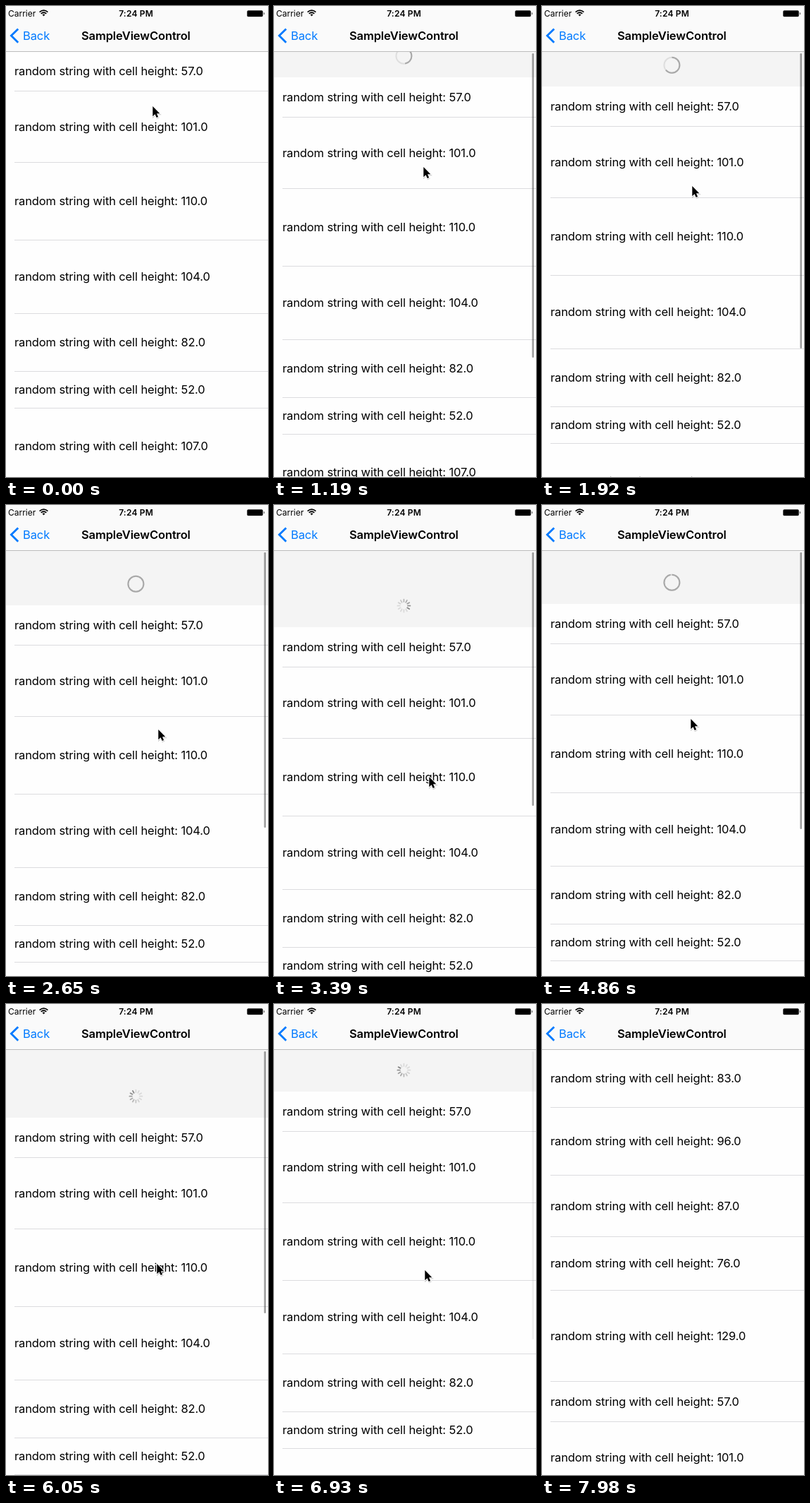
These frames come from a looping animation (372 px wide and 667 px high, 8780 ms). An HTML page:

```html
<!DOCTYPE html>
<html lang="en">
<head>
<meta charset="utf-8">
<title>Pull to refresh</title>
<style>
  html, body { margin: 0; width: 100%; height: 100%; overflow: hidden; background: #fff; }
  svg { display: block; width: 372px; height: 667px; }
  text { font-family: Inter, Roboto, sans-serif; font-size: 16.5px; letter-spacing: -0.12px; white-space: pre; }
  .semi { font-weight: 600; }
  .status { font-size: 12px; letter-spacing: 0; }
</style>
</head>
<body>
<svg viewBox="0 0 372 667">
  <defs><path id="arrow" d="M0 0V14.2L3.3 11.2 5.4 16 7.8 15 5.7 10.3H10Z"/></defs>
  <rect width="372" height="667" fill="#fefefe"/>
  <rect id="header" y="64" width="372" fill="#f4f4f4"/>
  <g id="before"></g>
  <g id="after"></g>
  <g id="ring" fill="none" stroke-width="2">
    <circle r="11" stroke="#dedede"/>
    <circle id="arc" r="11" stroke="#a8a8a8" pathLength="100" transform="rotate(-90)"/>
  </g>
  <g id="spinner" stroke="#808080" stroke-width="1.8" stroke-linecap="round"></g>
  <rect id="bar" x="366.4" y="67" width="2.6" rx="1.3"/>

  <rect width="372" height="64" fill="#fafafa"/>
  <rect y="64" width="372" height="1" fill="#bcbcbc"/>
  <text class="status" x="3" y="14.5">Carrier</text>
  <g fill="none" stroke="#000" stroke-width="1.7">
    <path d="M47.6 8.6Q53.5 3.6 59.4 8.6M49.7 10.9Q53.5 7.6 57.3 10.9"/>
    <path d="M51.5 12.3Q53.5 10.5 55.5 12.3L53.5 14.4Z" fill="#000" stroke="none"/>
  </g>
  <text class="status semi" x="184.6" y="14.5" text-anchor="middle" style="letter-spacing:.2px">7:24 PM</text>
  <rect x="342.5" y="6.5" width="22" height="8.5" rx="1.5" stroke="#000" stroke-opacity=".35"/>
  <path d="M365.8 9Q367.2 9.2 367.2 10.7T365.8 12.4Z" opacity=".6"/>
  <path d="M17.2 32.4L7.4 42.1 17.2 51.8" fill="none" stroke="#007aff" stroke-width="2.8"/>
  <text x="24" y="47.8" fill="#007aff">Back</text>
  <text class="semi" x="184.4" y="47.8" text-anchor="middle">SampleViewControl</text>

  <g id="cursor">
    <use href="#arrow" x=".5" y="1.2" opacity=".2" stroke="#000" stroke-width="1.6"/>
    <use href="#arrow" stroke="#fff" stroke-width="2" stroke-linejoin="round" paint-order="stroke"/>
  </g>
</svg>
<script>
const LOOP = 8780, FIRST = 450, STEP = 146.6, TOP = 64, FULL = 78;
const RELEASE = 6250, RELOAD = 7405, LEAVE = 7900;
const oldRows = [57, 101, 110, 104, 82, 52, 107];
const newRows = [83, 96, 87, 76, 129, ...oldRows];

// eased moves: start, end, pull distance reached, pointer height reached
const moves = [
  [300, 740, 23, 200],
  [890, 1430, 48, 250],
  [1700, 3660, 112, 393],
  [3800, 5180, 70, 288],
  [5230, 6210, 100, 377],
  [RELEASE, 6640, 60, 377],
  [RELOAD, RELOAD + 300, 0, 377]
];

const $ = id => document.getElementById(id);
const clamp = v => Math.max(0, Math.min(1, v));
const smooth = v => v * v * (3 - 2 * v);

function add(parent, tag, attrs, text = "") {
  const el = document.createElementNS("http://www.w3.org/2000/svg", tag);
  for (const k in attrs) el.setAttribute(k, attrs[k]);
  el.textContent = text;
  return parent.appendChild(el);
}

function buildRows(group, heights) {
  let y = TOP;
  for (const h of heights) {
    add(group, "text", { x: 12, y: y + h / 2 + 5.2 }, `random string with cell height: ${h}.0`);
    y += h;
    add(group, "rect", { x: 12, y: y - 1, width: 360, height: 1, fill: "#dcdcdf" });
  }
}

buildRows($("before"), oldRows);
buildRows($("after"), newRows);
const spokes = Array.from({ length: 12 }, (_, i) =>
  add($("spinner"), "path", { d: "M0 -5.6V-9", transform: `rotate(${i * 30})` }));

// the screen updates in even steps after a first rest
const snap = t => t < FIRST ? 0 : FIRST + STEP * Math.floor((t - FIRST) / STEP);

function pose(t) {
  let pull = 0, y = 142;
  for (const [from, to, nextPull, nextY] of moves) {
    const f = smooth(clamp((t - from) / (to - from)));
    pull += (nextPull - pull) * f;
    y += (nextY - y) * f;
  }
  const x = 208 + 0.075 * (y - 142) - 0.0019 * Math.min(t, RELEASE);
  return [pull, x, y].map(Math.round);
}

const show = (id, on) => $(id).setAttribute("visibility", on ? "visible" : "hidden");
const move = (id, x, y) => $(id).setAttribute("transform", `translate(${x} ${y})`);

function draw(time) {
  const t = snap(time);
  const [pull, x, y] = pose(t);
  const busy = pull > FULL || t > RELEASE;

  $("header").setAttribute("height", pull);
  move("before", 0, pull);
  move("after", 0, pull);
  show("before", t < RELOAD);
  show("after", t >= RELOAD);

  move("ring", 184.4, pull + 33.7);
  move("spinner", 184.4, pull + 33.7);
  show("ring", !busy);
  show("spinner", busy);
  $("arc").setAttribute("stroke-dasharray", `${100 * clamp(pull / FULL)} 200`);

  const head = Math.round((t * 0.36 - 30) / 30);
  spokes.forEach((s, i) => {
    const age = ((head - i) % 12 + 12) % 12;
    s.setAttribute("opacity", Math.max(0.22, 0.95 - age * 0.11));
  });

  $("bar").setAttribute("height", 468 - pull);
  $("bar").setAttribute("opacity", pull ? 0.38 * clamp((6950 - t) / 300) : 0);

  move("cursor", x + 0.3, y);
  show("cursor", t < LEAVE);
}

const start = performance.now();
function tick() {
  draw((performance.now() - start) % LOOP);
  requestAnimationFrame(tick);
}
tick();
</script>
</body>
</html>
```
